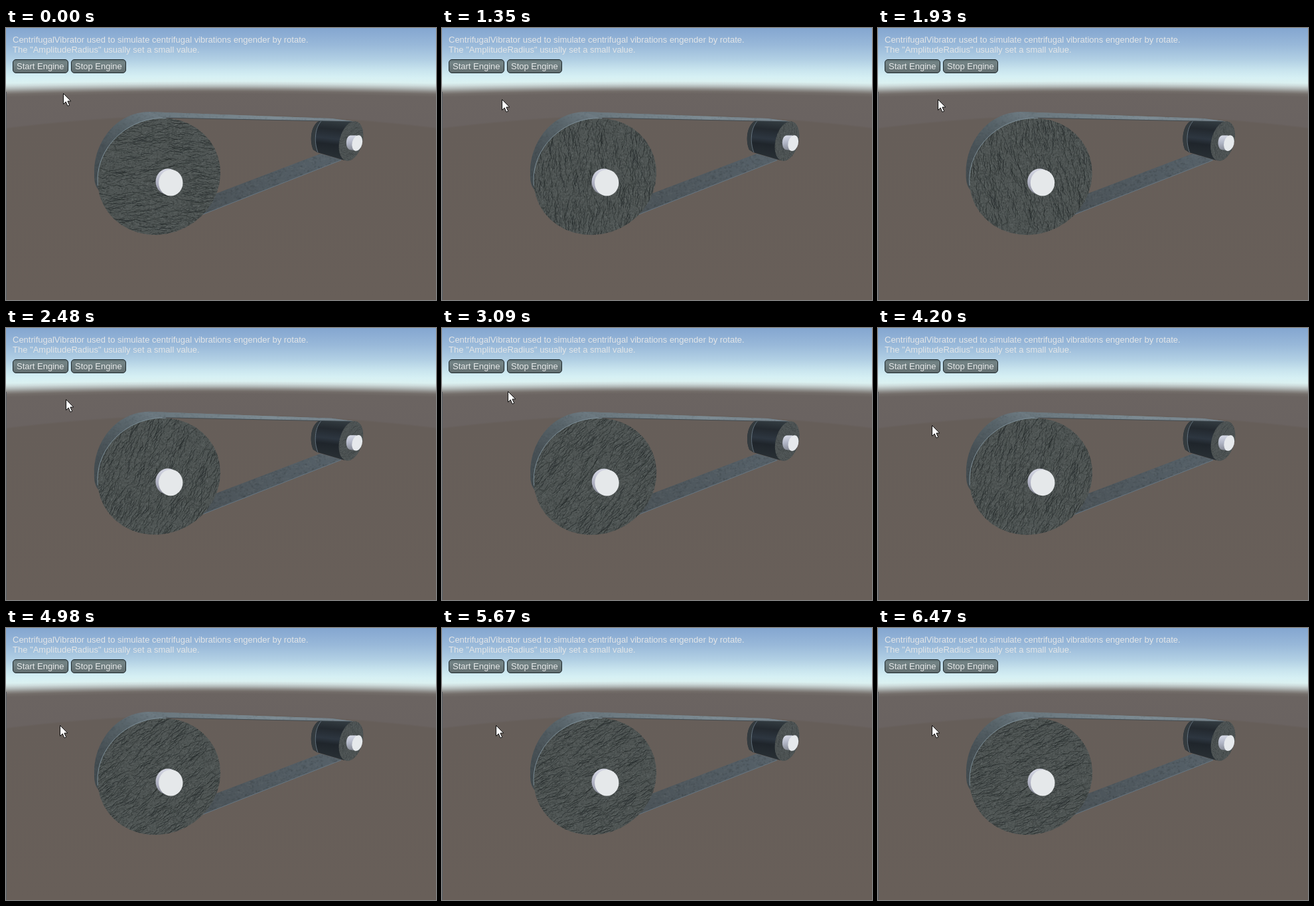
An HTML page with a canvas for the animation above (6650 ms loop, 648 by 409 pixels).

```html
<!DOCTYPE html>
<html lang="en">
<head>
<meta charset="utf-8">
<title>Belt drive</title>
<style>
html, body { margin: 0; width: 100%; height: 100%; overflow: hidden; background: #685f59; }
canvas { display: block; }
</style>
</head>
<body>
<canvas id="stage" width="648" height="409"></canvas>
<script>
const W = 648, H = 409, LOOP = 6650, TAU = Math.PI * 2, RAD = Math.PI / 180;
const ctx = document.getElementById('stage').getContext('2d');

let seed = 7;
const rand = () => (seed = (seed * 16807) % 2147483647) / 2147483647;

function layer(w, h, draw) {
  const c = document.createElement('canvas');
  c.width = w;
  c.height = h;
  draw(c.getContext('2d'));
  return c;
}

function gradient(g, x0, y0, x1, y1, stops) {
  const out = g.createLinearGradient(x0, y0, x1, y1);
  stops.forEach(([at, color]) => out.addColorStop(at, color));
  return out;
}

// Sky and ground; the horizon sags a little towards the sides.
const backdrop = layer(W, H, g => {
  const stops = [[0, '#84a6d0'], [25, '#98b8d9'], [48, '#b2d0e4'], [62, '#c8e4ee'], [73, '#d6f0f4'],
    [80, '#dbf1f1'], [84, '#cddbdb'], [88, '#b0b7b6'], [92, '#8a8885'], [95, '#736d69'], [99, '#6b6461']];
  for (let x = 0; x < W; x += 2) {
    const sag = ((x - W / 2) / (W / 2)) ** 2;
    const list = stops.map(([y, c]) => [(y + 5.5 * sag * (y / 100) ** 3) / H, c]);
    const edge = 129 + 20 * sag;
    list.push([edge / H, '#6a6361'], [(edge + 3) / H, '#665e59'], [1, '#685f59']);
    g.fillStyle = gradient(g, 0, 0, 0, H, list);
    g.fillRect(x, 0, 2, H);
  }
  g.fillStyle = '#596066';
  g.fillRect(0, 96, 1, H - 96);
});

function speckle(g, count) {
  for (let i = 0; i < count; i++) {
    g.fillStyle = rand() < 0.5 ? 'rgba(20,26,26,.2)' : 'rgba(128,136,132,.18)';
    g.fillRect(rand() * 256, rand() * 256, 1 + rand() * 2.5, 1 + rand() * 1.5);
  }
}

// Leather: wavy dark creases along x, each with a lit edge.
const leather = layer(256, 256, g => {
  g.fillStyle = '#4e5453';
  g.fillRect(0, 0, 256, 256);
  speckle(g, 9000);
  g.lineJoin = g.lineCap = 'round';
  for (let i = 0; i < 620; i++) {
    let x = rand() * 280 - 20, y = rand() * 256;
    const path = new Path2D();
    path.moveTo(x, y);
    for (let n = 2 + rand() * 4; n > 0; n--) {
      x += 3 + rand() * 5;
      y += (rand() - 0.5) * 6;
      path.lineTo(x, y);
    }
    g.save();
    g.translate(0, 1.5);
    g.strokeStyle = 'rgba(130,139,137,.2)';
    g.lineWidth = 1;
    g.stroke(path);
    g.restore();
    g.strokeStyle = 'rgba(24,29,30,.42)';
    g.lineWidth = 0.8 + rand();
    g.stroke(path);
  }
});
const rubber = layer(256, 256, g => speckle(g, 9000));
const grain = ctx.createPattern(rubber, 'repeat');

// Keys are [time, value]; slopes are limited so the motion never reverses.
function smooth(keys, t) {
  const slope = i => (keys[i + 1][1] - keys[i][1]) / (keys[i + 1][0] - keys[i][0]);
  const tangent = i => {
    if (i === 0 || i === keys.length - 1) return 0;
    const a = slope(i - 1), b = slope(i);
    return a * b <= 0 ? 0 : 2 * a * b / (a + b);
  };
  if (t >= keys[keys.length - 1][0]) return keys[keys.length - 1][1];
  const i = keys.findIndex((k, n) => t < keys[n + 1][0]);
  const d = keys[i + 1][0] - keys[i][0], u = (t - keys[i][0]) / d, v = 1 - u;
  return keys[i][1] * (1 + 2 * u) * v * v + keys[i + 1][1] * u * u * (3 - 2 * u)
    + d * (tangent(i) * u * v * v - tangent(i + 1) * u * u * v);
}

const spin = [[0, 0], [300, 3], [1350, 90], [2480, 475], [3090, 671], [3450, 762],
  [4200, 830], [4980, 863], [6470, 878]];
const pointer = [[0, 86, 98], [260, 70, 56], [440, 70, 56], [680, 89, 91], [900, 90, 107],
  [2740, 90, 107], [3090, 99, 95], [3330, 130, 56], [3500, 130, 56], [4030, 81, 146]];
const along = n => pointer.map(k => [k[0], k[n]]);
const pointerX = along(1), pointerY = along(2);

const shape = d => new Path2D(d);
function fill(path, color) { ctx.fillStyle = color; ctx.fill(path); }
function line(path, color, width = 1) {
  ctx.strokeStyle = color;
  ctx.lineWidth = width;
  ctx.stroke(path);
}
function ellipse(x, y, rx, ry, tilt = 0, from = 0, to = 360) {
  const p = new Path2D();
  p.ellipse(x, y, rx, ry, tilt * RAD, from * RAD, to * RAD);
  return p;
}

function disc(x, y, rx, ry, tilt, angle, reach) {
  ctx.save();
  ctx.translate(x, y);
  ctx.rotate(tilt * RAD);
  ctx.scale(rx, ry);
  ctx.rotate((angle - tilt) * RAD);
  ctx.beginPath();
  for (let i = 0; i < 40; i++) ctx.lineTo(Math.cos(i * TAU / 40), Math.sin(i * TAU / 40));
  ctx.clip();
  ctx.drawImage(leather, -reach, -reach, 2 * reach, 2 * reach);
  ctx.restore();
}

function texture(path, x, y, tilt, shift, alpha) {
  ctx.save();
  ctx.clip(path);
  ctx.globalAlpha = alpha;
  ctx.translate(x, y);
  ctx.rotate(tilt * RAD);
  ctx.translate(shift, 0);
  ctx.fillStyle = grain;
  ctx.fillRect(-600 - shift, -300, 1200, 600);
  ctx.restore();
}

const lowerBelt = shape('M290 259L474 189L506 198L292 282Z');
const upperBelt = shape('M139 243C134 237 132.5 228 133 217C133 171 166 127 215 126L240 127L491 136L525 140.5L236 134.5L210 225Z');
const topStrip = shape('M215 126L240 127L491 136L525 140.5L236 134.5Z');
const pulley = shape('M474 139C461 143 456 166 463 183L469 187L510 199L523 141L492 136Z');
const rearRim = shape('M474 139C461 143 456 166 463 183L470 187C464 172 465 150 475 139Z');

function machine(angle) {
  const travel = (angle * 1.6) % 256;

  fill(lowerBelt, gradient(ctx, 300, 270, 500, 195, [[0, '#4b5358'], [1, '#566169']]));
  texture(lowerBelt, 300, 270, -21, -travel, 0.5);
  line(shape('M294 281.3L505 198.7'), '#697d8c', 0.8);

  fill(pulley, gradient(ctx, 482, 137, 476, 193,
    [[0, '#343d42'], [0.25, '#23292f'], [0.5, '#2d3640'], [0.65, '#1f252b'], [1, '#282f34']]));
  fill(rearRim, '#343b3f');
  line(shape('M475 140C465 151 464 172 470 187'), '#71818d', 0.8);

  fill(upperBelt, gradient(ctx, 215, 126, 145, 245,
    [[0, '#6d7a82'], [0.25, '#58646a'], [0.6, '#485156'], [1, '#40494d']]));
  fill(topStrip, gradient(ctx, 215, 0, 525, 0, [[0, '#68757c'], [0.6, '#7d8b93'], [1, '#74818a']]));
  texture(upperBelt, 215, 128, 2, travel, 0.3);
  line(shape('M236 135L522 140.8'), '#3c464c', 0.8);

  disc(520, 170, 30.5, 17.2, -75, angle * 3, 2.2);
  fill(ellipse(520, 170, 30.3, 17, -75), 'rgba(78,84,86,.5)');

  disc(230.5, 223.3, 94, 86.5, -25, angle, 1.02);
  line(ellipse(230.5, 223.2, 93.8, 86.4, -25, 198, 300), '#82939c', 0.9);

  fill(ellipse(244, 231, 18.5, 19.5), gradient(ctx, 228, 214, 234, 249,
    [[0, '#d6d8e4'], [0.5, '#b1b3c4'], [1, '#8d8f9d']]));
  fill(ellipse(248.3, 232.7, 18.2, 19.7), '#e5e8ea');

  fill(shape('M528 161.5L519 161.5C511 163 511 181 518 183L528 184.5Z'),
    gradient(ctx, 515, 161, 519, 184, [[0, '#dcdfeb'], [0.5, '#b2b7c7'], [1, '#868a95']]));
  fill(ellipse(529.3, 173, 7.6, 12, 14), '#e6e9ec');
}

function button(x, width, label, hover, down) {
  const box = new Path2D();
  box.roundRect(x + 0.5, 47.5, width - 1, 20, 4.5);
  fill(box, gradient(ctx, 0, 47, 0, 68, down
    ? [[0, '#465457'], [1, '#667477']]
    : [[0, '#5f7073'], [0.25, '#748486'], [0.55, '#6c7a7c'], [1, '#606c6e']]));
  line(box, hover ? '#dce5e8' : '#1d282c');
  ctx.fillStyle = hover ? '#fff' : '#e6e9e9';
  ctx.textAlign = 'left';
  ctx.fillText(label, x + 6, 62);
  ctx.textAlign = 'left';
}

const arrow = shape('M.5 .5V16.5L4.2 13L7 19.3L9.7 18.1L6.9 12H11.8Z');

function render(t) {
  ctx.drawImage(backdrop, 0, 0);
  const angle = smooth(spin, t);
  const speed = (angle - smooth(spin, Math.max(0, t - 20))) / 7;
  ctx.save();
  ctx.translate(0.3 * speed * Math.cos(angle * 0.3), 0.3 * speed * Math.sin(angle * 0.3));
  machine(angle);
  ctx.restore();

  ctx.font = '13px "Liberation Sans", Arial, sans-serif';
  ctx.textAlign = 'left';
  ctx.fillStyle = '#e2e5e7';
  ctx.fillText('CentrifugalVibrator used to simulate centrifugal vibrations engender by rotate.', 10, 22);
  ctx.fillText('The "AmplitudeRadius" usually set a small value.', 10, 37);

  const x = smooth(pointerX, t), y = smooth(pointerY, t);
  const over = left => x >= left && x <= left + 84 && y >= 47 && y <= 68;
  button(10, 84, 'Start Engine', over(10), t > 310 && t < 400);
  button(98, 83, 'Stop Engine', over(98), t > 3390 && t < 3470);

  ctx.save();
  ctx.translate(x, y);
  fill(arrow, '#fff');
  line(arrow, '#111');
  ctx.restore();
}

const start = performance.now();
function tick() {
  render((performance.now() - start) % LOOP);
  requestAnimationFrame(tick);
}
tick();
</script>
</body>
</html>
```
